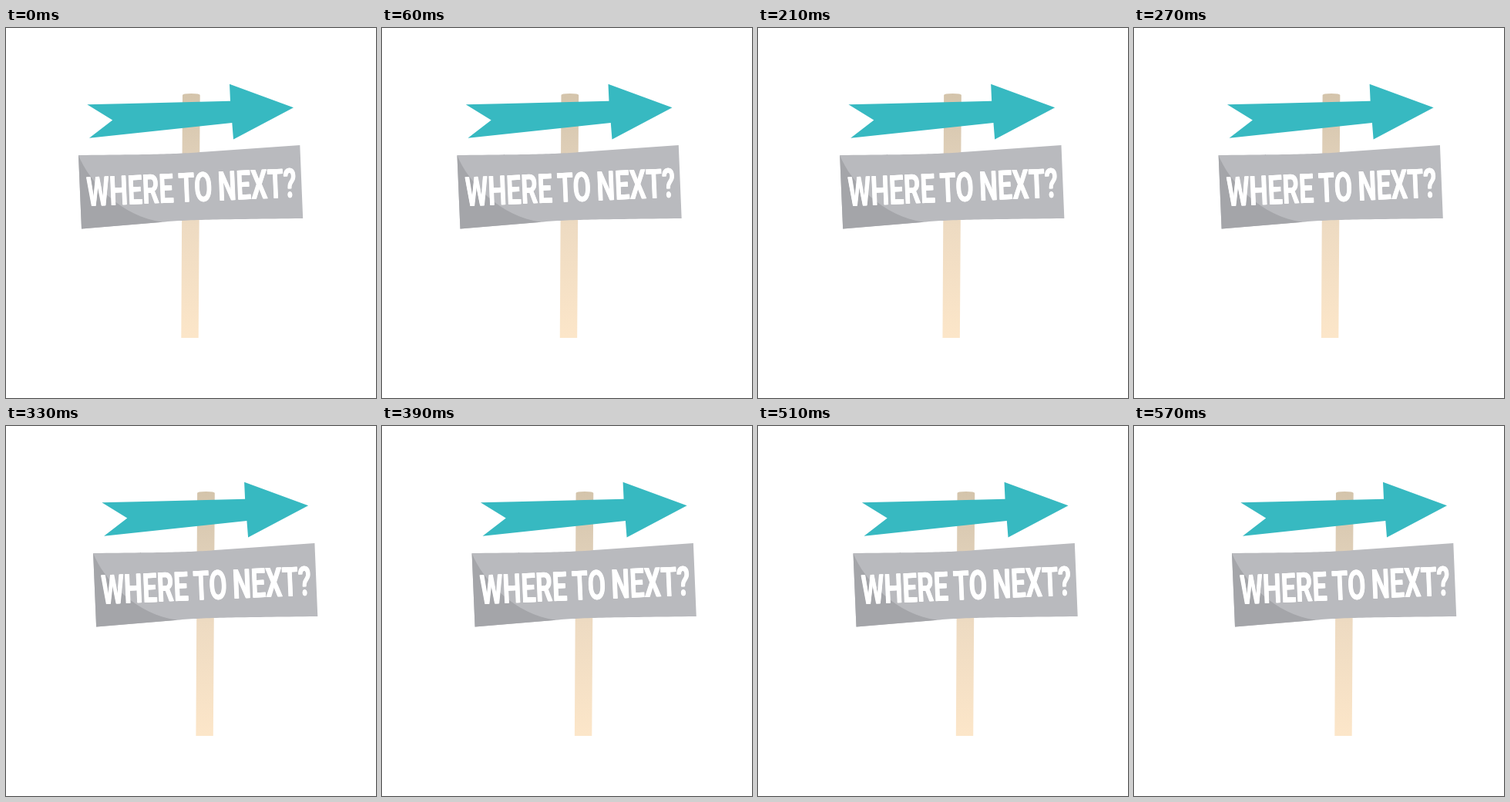
These frames come from a looping animation (480 px wide and 480 px high, 600 ms). An HTML page:

```html
<!DOCTYPE html>
<html lang="en">
<head>
<meta charset="utf-8">
<title>Where to next?</title>
<style>
  html, body { margin: 0; width: 100%; height: 100%; overflow: hidden; background: #fff; }
  svg { display: block; width: 100%; height: 100%; }
  text { font: bold 53px Roboto, "Liberation Sans", sans-serif; word-spacing: -1.5px; fill: #fff; }
</style>
</head>
<body>
<svg viewBox="0 0 480 480">
  <defs>
    <linearGradient id="wood" x1="0" y1="0" x2="0" y2="1">
      <stop offset="0" stop-color="#d4c4ab"/>
      <stop offset=".25" stop-color="#dfcfb8"/>
      <stop offset=".55" stop-color="#eedbc2"/>
      <stop offset="1" stop-color="#fce6c9"/>
    </linearGradient>
  </defs>
  <g id="signpost">
    <path fill="url(#wood)" d="M229 87 Q229 85 240.3 85 Q251.7 85 251.7 87 L249.7 402 H227.3 Z"/>
    <path fill="#37b9c1" d="M105.3 99.2 L150 98.2 L291 94.8 L290 72.7 L373 103.3 L295 144.5 L293.3 123 L108 142.7 L138.2 119.6 Z"/>
    <path fill="#b9babe" d="M94 165 C190 164 215 164 260 160.5 L381.3 152 L385.2 247 C280 248.3 240 248.3 203 251.7 L98 260.5 Z"/>
    <path fill="#a4a5a9" d="M94 165 C108 200 150 245 203 251.7 L98 260.5 Z"/>
    <!-- Condensed lettering, leaning with the board; the offset copies thicken the stems -->
    <text id="lettering" transform="matrix(.636 -.0273 .043 1 105.4 231.2)">WHERE TO NEXT?</text>
    <use href="#lettering" x="-.4"/>
    <use href="#lettering" x=".4"/>
  </g>
</svg>
<script>
  const LOOP = 600, STEP = 30, TRAVEL = 33;
  const LAST = LOOP / STEP - 1;
  const signpost = document.getElementById("signpost");
  const start = performance.now();

  function draw(time) {
    const step = Math.floor((time % LOOP) / STEP);
    signpost.setAttribute("transform", `translate(${TRAVEL * step / LAST} 0)`);
  }

  function tick() {
    draw(performance.now() - start);
    requestAnimationFrame(tick);
  }
  tick();
</script>
</body>
</html>
```
